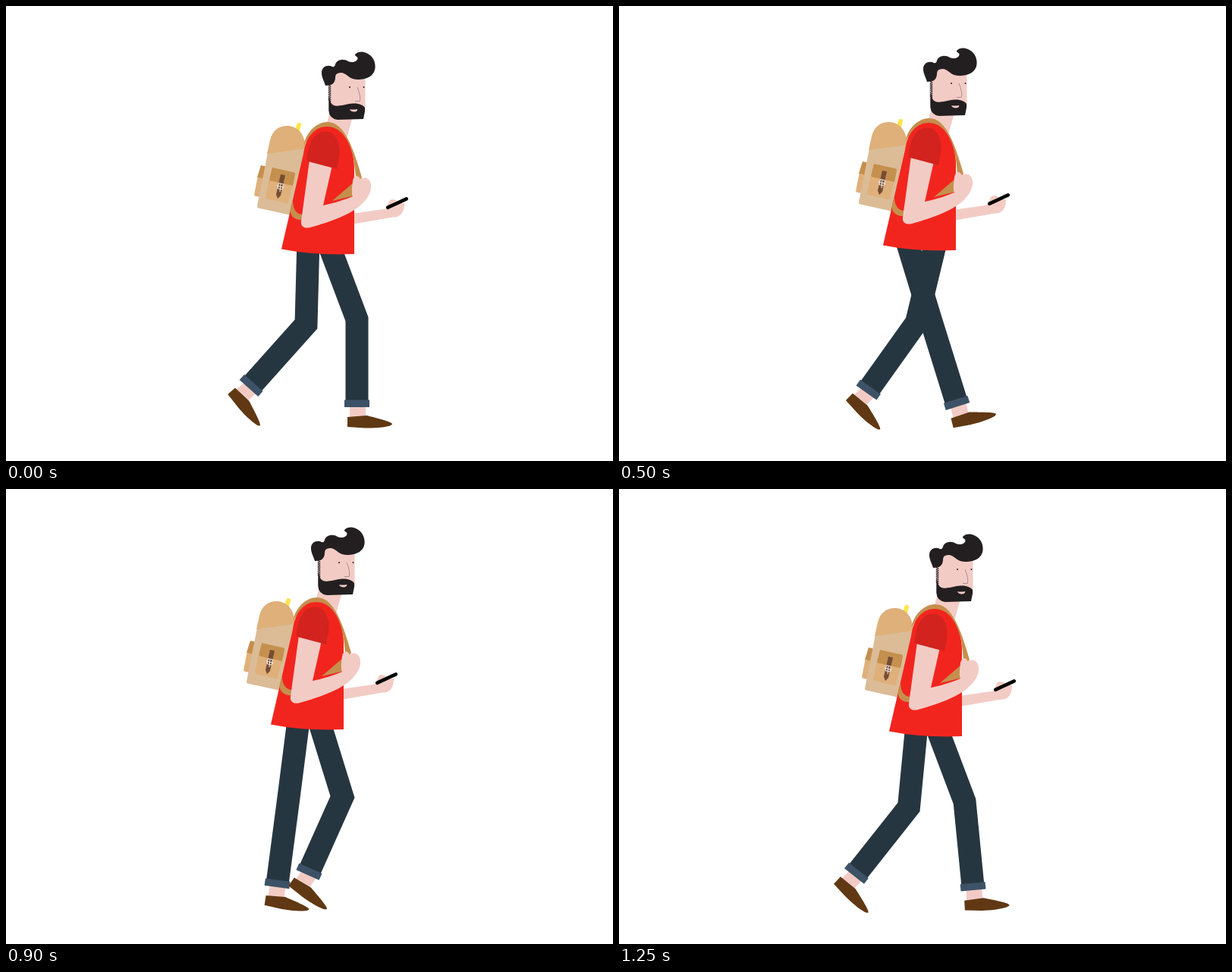
These frames come from a looping animation (800 px wide and 600 px high, 1300 ms). An HTML page:

```html
<!DOCTYPE html>
<html lang="en">
<head>
<meta charset="utf-8">
<title>Walking man</title>
<style>
  html, body { margin: 0; width: 100%; height: 100%; overflow: hidden; background: #fff; }
  svg { display: block; width: 800px; height: 600px; }
  .skin { fill: #f3cbc5; }
  .ink { fill: #231f20; }
  .red { fill: #f2251e; }
  .strap { fill: #c58f4d; }
  .tan { fill: #dfb07a; }
  .pack { fill: #dbbc97; }
  .cuff { fill: #3d5266; }
  .shoe { fill: #603813; }
  .leather { fill: #754c35; }
  .pants { fill: none; stroke: #263640; stroke-width: 30; stroke-miterlimit: 8; }
  .line { fill: none; }
</style>
</head>
<body>
<svg viewBox="0 0 800 600">
  <defs>
    <g id="foot">
      <path class="skin" d="M-9.5-4H11.5V14H-9.5Z"/>
      <path class="shoe" d="M-12.5 13L13 11C24 14 46 19 46.5 22C46.5 26 25 28 10 27.5L-12.5 26Z"/>
    </g>
  </defs>
  <g id="legs"></g>
  <g id="body">
    <!-- far arm and phone -->
    <path class="skin" d="M455 274L500 267.5C504 264 503 255 509 255C514 255 516 259 519 260L525 260C525 272 520 279 510 278.5L455 288Z"/>
    <path class="line" d="M503.3 265.7L527.7 254.3" stroke="#000" stroke-width="4.6" stroke-linecap="round"/>

    <!-- neck and head -->
    <path class="skin" d="M428 135L421 162L448 178L457 146Z"/>
    <path class="skin" d="M427 84H473.5V138H427Z"/>
    <path class="ink" d="M425.3 120L428 127Q430 132 437 131.8C446 131 450 129 457 128.6C465 128 471 131 473 134V139L471 149L437 150Q426 148.500 425.3 138Z"/>
    <path class="skin" d="M453 136.300Q458 137 463.300 136Q463 140 458 139.500Q454 139 453 136.300Z"/>
    <path class="line" id="sideburn" stroke="#231f20" stroke-width="1.3"/>
    <path class="line" d="M463 107Q468 119 466.400 125.500H460" stroke="#a58984" stroke-width=".9"/>
    <circle class="ink" cx="453" cy="107" r="1"/>
    <circle class="ink" cx="471.500" cy="107" r="1"/>
    <path class="ink" d="M421 105C419 98 416 94 416 88C416 80 424 77 430 80Q433 81 434 77C436 70 446 69 451 73C456 75 463 74 463.500 69C463.500 66 460 67 460 64C465 58 476 60 482 67C488 74 488 85 483 90C477 97 465 98 457 96C450 93 446 87 441 88Q434 88 434 94C434 101 430 104 426 104.500Z"/>

    <!-- backpack -->
    <path class="line" d="M386 157L383 168" stroke="#fbe54e" stroke-width="6" stroke-linecap="round"/>
    <path class="strap" d="M336 210L345 212L341 229L331 226Z"/>
    <path class="tan" d="M331.500 226L341 228L335 252L328 250.500Q327 250 327.300 248Z"/>
    <path class="pack" d="M346 188L331 264Q331 266 333 266.500L376 276L398 184Z"/>
    <path class="tan" d="M344 195L348 177C351 164 360 158 370 158C384 158 394 168 395 188Z"/>
    <path class="tan" d="M347 228L378 235L372 259Q371 261 369 260L344 254Q342 253 342.300 251Z"/>
    <path class="strap" d="M351 213L380 219.500Q381.500 220 381 222L378 237L349 230.500Q347 230 347.300 228Z"/>
    <path class="leather" d="M362 222L368 223.300L362 250L358 254L356 248.500Z"/>
    <path class="line" d="M359.500 233.500L365.500 235L364 242L358 240.500ZM357 237L366.500 239.500M362 234L361 245" stroke="#f4eee8" stroke-width="1"/>

    <!-- shirt and straps -->
    <path class="red" d="M363 320.500L392 195C396 170 406 158 422 157C444 157 459 185 459 212V327Q405 329 363 320.500Z"/>
    <path class="strap" d="M378 256C378 270 384 275 392 275V282C381 283 373 277 375 266Z"/>
    <path class="strap" d="M393 184C393 172 406 153 424 153C446 153 458 188 469 226L462 236C460 216 459 201 455 190C449 170 437 159 423 159C408 159 400 170 393 184Z"/>
    <path class="strap" d="M459 232L430 257L459 250Z"/>

    <!-- near arm -->
    <path class="skin" d="M400 203L389 284C388 291 394 294 401 292C430 284 455 274 467 263C477 254 482 245 481 236C480 227 472 224 467 229C465 222 458 223 457 231C456 240 455 247 457 251Q438 259 418 263L430 210Z"/>
    <path d="M396.500 204.500C398 181 406 165.500 421 165.500C436 165.500 441 183 439 199L436 215Z" fill="#d2231e"/>
  </g>
</svg>
<script>
const LOOP = 1300, STEP = 50;
const byId = id => document.getElementById(id);

// Torso track: time, right hem x, hem y
const BODY = [
  [0, 459, 327], [50, 459, 324], [150, 459, 317], [350, 450, 317],
  [500, 444, 322], [600, 454, 326], [700, 462, 328], [800, 455, 320],
  [900, 445, 317], [1050, 441, 323], [1100, 443, 325], [1250, 452, 326]
];

// Leg poses: time, knee x y, ankle x y, foot angle
const LEGS = [
  { hip: -61, poses: [
    [0, 395.5, 419.5, 320, 504, 48],
    [150, 431, 408, 352, 490, 51.5],
    [250, 423, 407, 374, 505, 38],
    [500, 411, 414, 446.5, 528, -14],
    [550, 426, 412, 463, 529, -9],
    [600, 438, 415, 454, 530, -3],
    [700, 422, 418, 422.5, 530, 0],
    [800, 396, 412, 390, 530, 1],
    [900, 372, 411, 357, 525, 9],
    [1050, 356.5, 412, 313.5, 519.5, 25],
    [1100, 346, 414, 296, 513, 33],
    [1250, 382, 419.5, 310, 510.5, 43.5]
  ] },
  { hip: -29, poses: [
    [0, 462.5, 413, 462.5, 529, 0],
    [150, 431.5, 413, 431, 531, 0],
    [250, 414, 412, 400, 531, 0],
    [350, 397, 411, 368, 527, 8],
    [500, 392, 417.5, 326, 510, 44],
    [550, 400, 419, 322, 504, 46],
    [700, 440, 415, 357.5, 495, 53],
    [900, 443.5, 406, 397.5, 509, 35],
    [1050, 442, 412, 459, 528.5, -8],
    [1100, 442, 414, 477, 528, -13],
    [1250, 455.5, 412, 467, 529, -3]
  ] }
];

// Periodic, overshoot-free cubic through the keys; returns all columns at t
function track(keys) {
  const n = keys.length;
  const at = i => {
    const k = keys[(i + n) % n], lap = Math.floor(i / n);
    return [k[0] + lap * LOOP, ...k.slice(1)];
  };
  const rate = (i, c) => (at(i + 1)[c] - at(i)[c]) / (at(i + 1)[0] - at(i)[0]);
  const tangent = (i, c) => {
    const a = rate(i - 1, c), b = rate(i, c);
    return a * b > 0 ? 2 * a * b / (a + b) : 0;
  };
  return t => {
    let i = n - 1;
    while (keys[i][0] > t) i--;
    const p = at(i), q = at(i + 1), h = q[0] - p[0], u = (t - p[0]) / h;
    const s = u * u * (3 - 2 * u);
    return p.slice(1).map((v, j) => {
      const c = j + 1;
      return v + (q[c] - v) * s
        + h * u * (1 - u) * ((1 - u) * tangent(i, c) - u * tangent(i + 1, c));
    });
  };
}

const body = track(BODY);
const polar = (dx, dy) => [Math.atan2(dx, dy), Math.hypot(dx, dy)];
const move = (x, y, angle, len) => [x + len * Math.sin(angle), y + len * Math.cos(angle)];

function makeLeg({ hip, poses }) {
  const g = document.createElementNS('http://www.w3.org/2000/svg', 'g');
  g.innerHTML = '<use href="#foot"/><path class="pants"/><path class="cuff" d="M-16.5-9.5H16.5V0H-16.5Z"/>';
  byId('legs').append(g);
  const [foot, pants, cuff] = g.children;
  const pose = track(poses.map(([t, kx, ky, ax, ay, turn]) => {
    const [bx, by] = body(t);
    return [t, ...polar(kx - bx - hip, ky - by), ...polar(ax - kx, ay - ky), turn];
  }));
  const place = (el, x, y, deg) => el.setAttribute('transform', `translate(${x} ${y}) rotate(${deg})`);
  return (t, bx, by) => {
    const [thigh, thighLen, shin, shinLen, turn] = pose(t);
    const x = bx + hip;
    const top = move(x, by, thigh, -20);
    const knee = move(x, by, thigh, thighLen);
    const hem = move(...knee, shin, shinLen - 5);
    const ankle = move(...knee, shin, shinLen);
    pants.setAttribute('d', `M${top}L${knee}L${hem}`);
    place(cuff, ...ankle, -shin * 180 / Math.PI);
    place(foot, ...ankle, turn);
  };
}

const legs = LEGS.map(makeLeg);
byId('sideburn').setAttribute('d',
  Array.from({ length: 9 }, (_, i) => `M424.8 ${104 + i * 2.4}l3.4 2.6`).join(''));

function draw(now) {
  const t = Math.floor(now % LOOP / STEP) * STEP;
  const [x, y] = body(t);
  byId('body').setAttribute('transform', `translate(${x - 459} ${y - 327})`);
  legs.forEach(leg => leg(t, x, y));
}

const start = performance.now();
function tick() {
  draw(performance.now() - start);
  requestAnimationFrame(tick);
}
tick();
</script>
</body>
</html>
```
